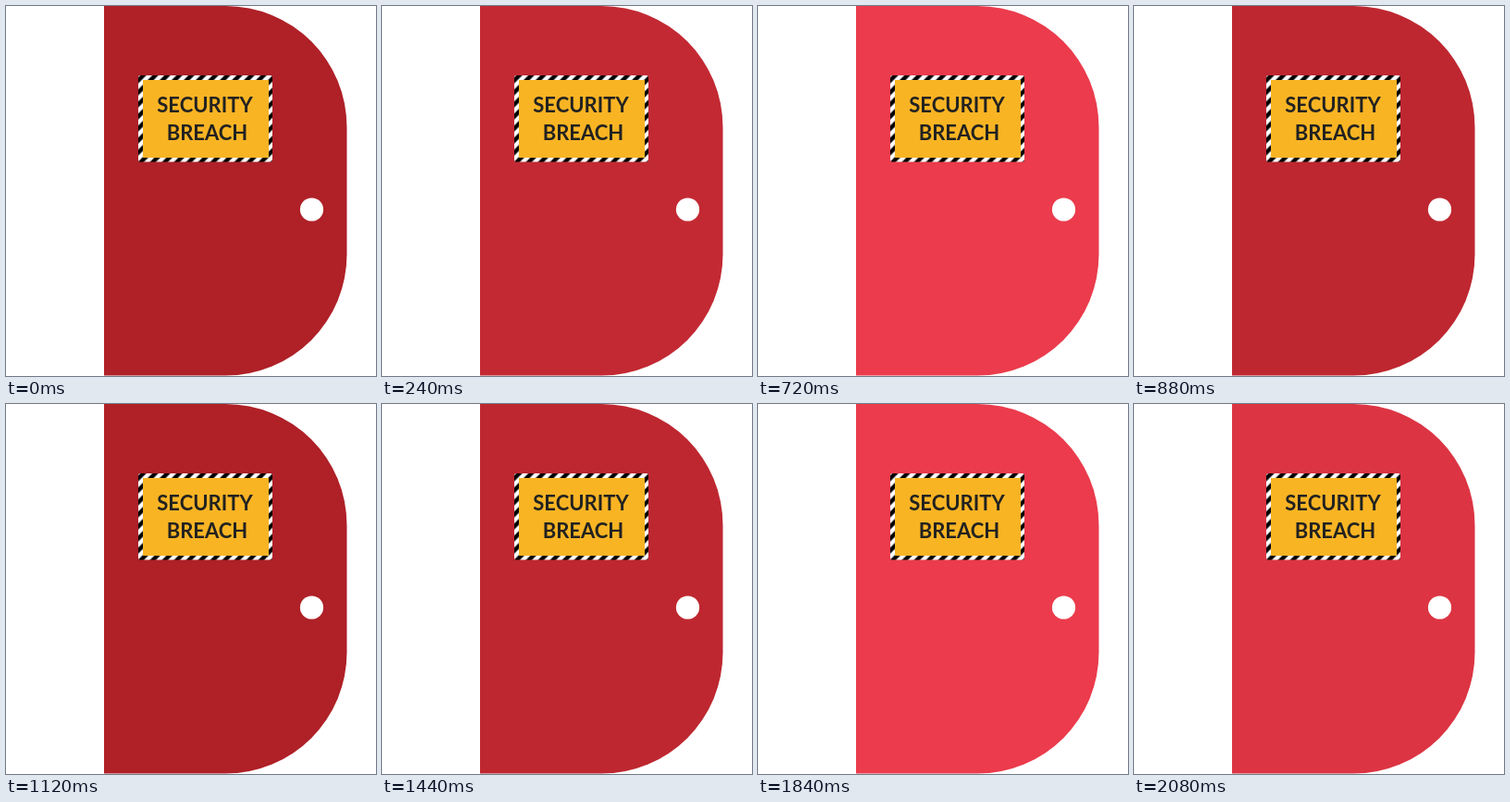
Animation, 400 px wide and 400 px high, one loop 2.16 s. Source, as an HTML page:

```html
<!DOCTYPE html>
<html lang="en">
<head>
<meta charset="utf-8">
<title>Security breach</title>
<style>
  html, body { margin: 0; width: 100%; height: 100%; overflow: hidden; background: #fff; }
  svg { display: block; width: 100vw; height: 100vh; }
  text { font: 700 22px Lato, "Open Sans", sans-serif; fill: #222220; text-anchor: middle; }
</style>
</head>
<body>
<svg viewBox="0 0 400 400">
  <defs>
    <pattern id="hazard" width="9.2" height="9.2" patternUnits="userSpaceOnUse"
             patternTransform="translate(143 75) rotate(45)">
      <rect width="9.2" height="9.2" fill="#fff"/>
      <rect x="1.5" width="4.6" height="9.2" fill="#000"/>
    </pattern>
  </defs>
  <path id="door" fill="#af2027"
        d="M106 0H237.5A131 131 0 0 1 368.5 131V268.5A131 131 0 0 1 237.5 399.5H106Z"/>
  <circle cx="330.5" cy="220" r="12.6" fill="#fff"/>
  <rect x="143" y="75" width="145" height="93.5" rx="2" fill="url(#hazard)"/>
  <rect x="148" y="80" width="136" height="84" fill="#f9b424"/>
  <text x="215" y="115">SECURITY</text>
  <text x="217.5" y="145">BREACH</text>
</svg>
<script>
  const LOOP = 2160, STEP = 80, PULSE = 280, PEAK = 160;
  const DARK = [175, 32, 39], BRIGHT = [235, 59, 76];
  const door = document.getElementById("door");
  const start = performance.now();

  // Linear rise to the peak, then a quicker linear fall.
  function glow(ms) {
    const t = ms % PULSE;
    return t < PEAK ? t / PEAK : (PULSE - t) / (PULSE - PEAK);
  }

  function draw(now) {
    const t = Math.max(0, now - start) % LOOP;
    const k = glow(Math.floor(t / STEP) * STEP);
    const rgb = DARK.map((c, i) => Math.round(c + (BRIGHT[i] - c) * k));
    door.setAttribute("fill", `rgb(${rgb})`);
    requestAnimationFrame(draw);
  }
  draw(start);
</script>
</body>
</html>
```
